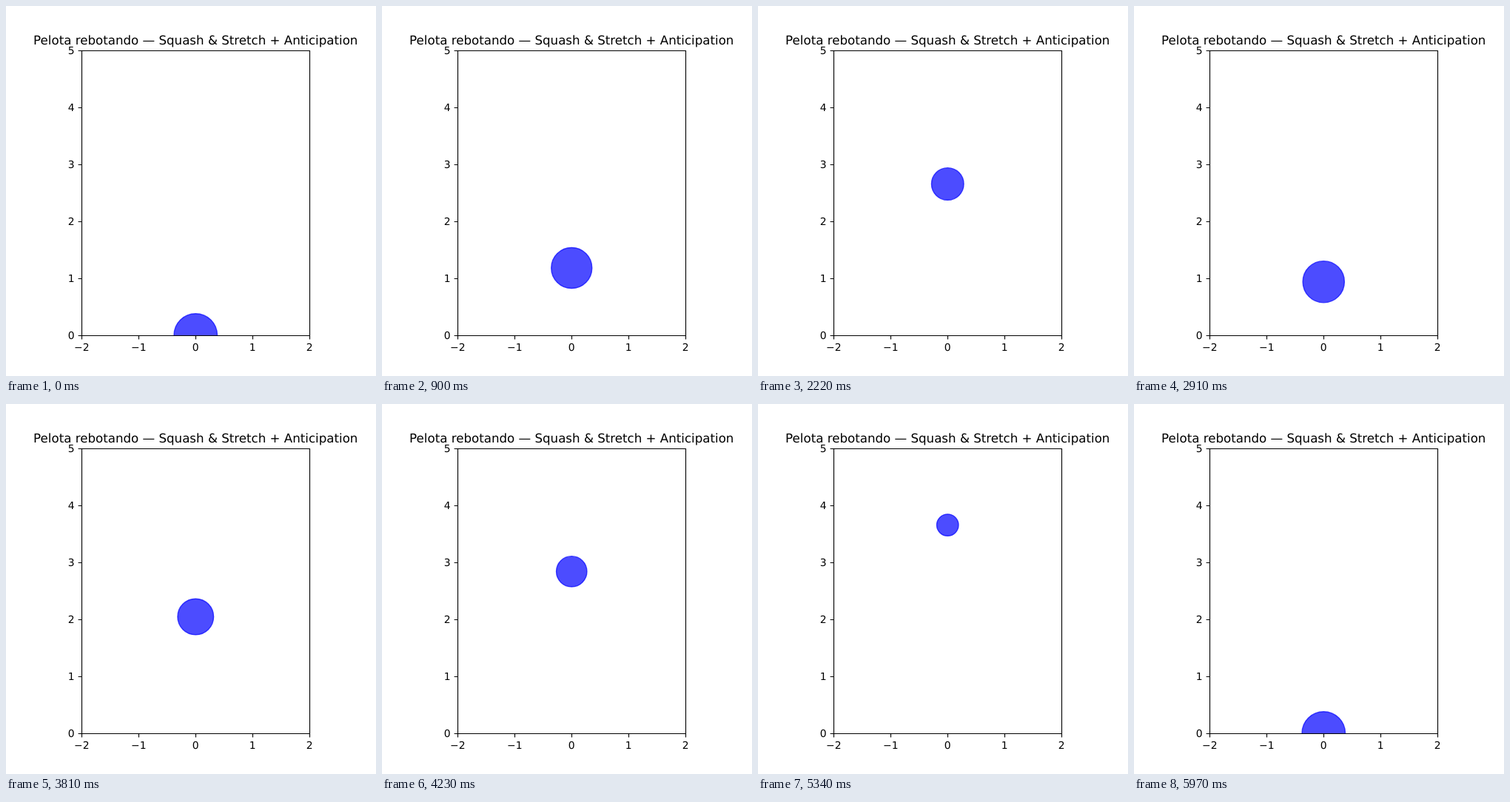
An HTML page for the animation above (6 s loop, 500 px wide and 500 px high).

```html
<!DOCTYPE html>
<html lang="es">
<head>
<meta charset="utf-8">
<title>Pelota rebotando</title>
<style>
  html, body { margin: 0; width: 100%; height: 100%; overflow: hidden; background: #fff; }
  svg { display: block; width: 500px; height: 500px; }
  text { font-family: "DejaVu Sans", sans-serif; font-size: 13.89px; text-rendering: geometricPrecision; }
  .title { font-size: 16.667px; }
  #axes { fill: none; stroke: #000; stroke-width: 1.11; }
  #ball { fill: #00f; fill-opacity: .7; stroke: #00f; stroke-opacity: .7; stroke-width: 1.389; }
</style>
</head>
<body>
<svg viewBox="0 0 500 500">
  <clipPath id="plot"><rect x="102" y="60" width="308" height="385"/></clipPath>
  <g clip-path="url(#plot)"><circle id="ball" cx="256.25"/></g>
  <path id="axes"/>
  <g id="labels"></g>
  <text class="title" x="256.25" y="52" text-anchor="middle">Pelota rebotando — Squash &amp; Stretch + Anticipation</text>
</svg>
<script>
  const UNIT = 77, FLOOR = 445;
  const STEP = 30, STEPS = 200, BOUNCES = 6;
  const HEIGHT = 4, R_MIN = 0.15, R_SPAN = 0.23, LAG = 0.02;
  const $ = id => document.getElementById(id);

  function addLabel(value, x, y, anchor) {
    const el = document.createElementNS("http://www.w3.org/2000/svg", "text");
    el.setAttribute("x", x);
    el.setAttribute("y", y);
    el.setAttribute("text-anchor", anchor);
    el.textContent = String(value).replace("-", "\u2212");
    $("labels").append(el);
  }

  function drawAxes() {
    let d = "M102.5 60.5H410.5V445.5H102.5Z";
    for (let v = -2; v <= 2; v++) {
      const x = 256.5 + v * UNIT;
      d += `M${x} 445.5v4.9`;
      addLabel(v, x - 0.25, 466, "middle");
    }
    for (let v = 0; v <= 5; v++) {
      const y = 445.5 - v * UNIT;
      d += `M102.5 ${y}h-4.9`;
      addLabel(v, 92.5, y + 4.5, "end");
    }
    $("axes").setAttribute("d", d);
  }

  // The radius swells near the floor and trails the height slightly.
  function drawBall(time) {
    const step = Math.floor(time / STEP) % STEPS;
    const phase = Math.PI * BOUNCES * step / (STEPS - 1);
    const y = HEIGHT * Math.abs(Math.sin(phase));
    const r = R_MIN + R_SPAN * Math.cos(phase - LAG) ** 2;
    $("ball").setAttribute("cy", FLOOR - y * UNIT);
    $("ball").setAttribute("r", r * UNIT);
  }

  drawAxes();
  const start = performance.now();
  function tick() {
    drawBall(performance.now() - start);
    requestAnimationFrame(tick);
  }
  tick();
</script>
</body>
</html>
```
